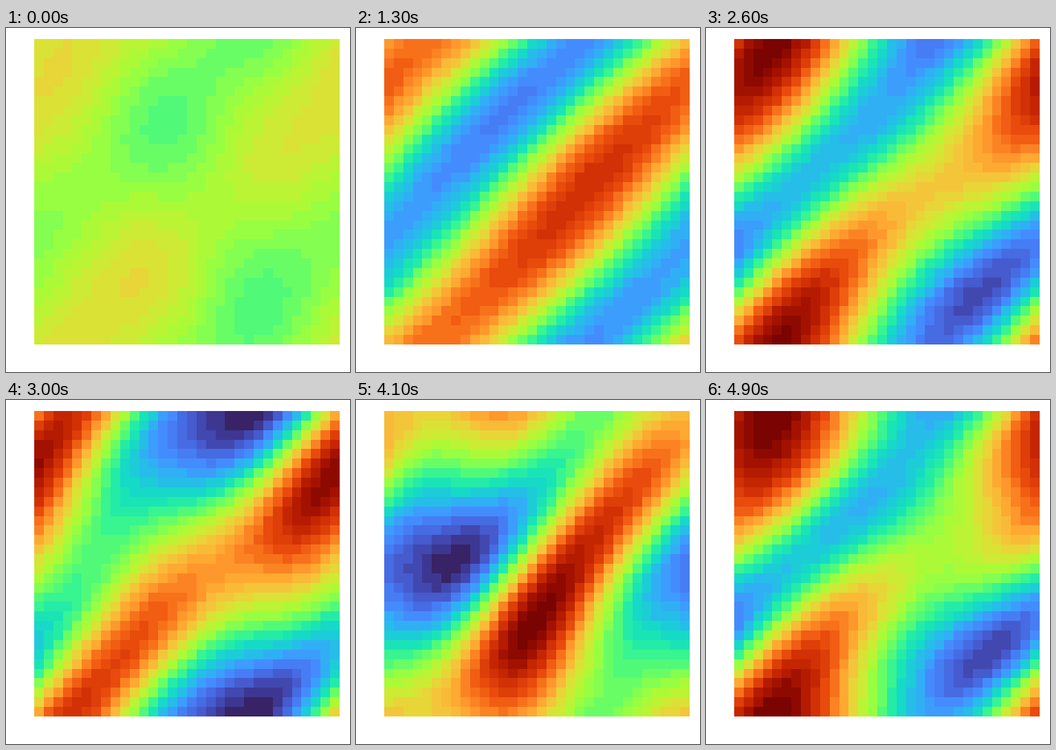
These frames come from a looping animation (500 by 500 pixels, 5000 ms). A matplotlib script:

```python
import numpy as np
import matplotlib.pyplot as plt
from matplotlib.animation import FuncAnimation

CELLS, FRAMES, INTERVAL = 32, 50, 100
MEAN = 0.51

angle = 2 * np.pi * np.arange(CELLS) / CELLS
X, Y = np.meshgrid(angle, angle)


def phasor(amp, degrees):
    return amp * np.exp(1j * np.radians(degrees))


STRIPE = phasor(1, 44.5)

# Initial disturbance that dies out, keyed by wave numbers (kx, ky)
NOISE = {
    (1, 0): phasor(0.030, 36),
    (1, -1): phasor(0.016, -160),
    (2, -1): phasor(0.012, 15),
}


def logistic(t, rate, center):
    return 1 / (1 + np.exp(-rate * (t - center)))


def modes(t):
    """Complex amplitude of every wave, keyed by wave numbers (kx, ky)."""
    # A diagonal stripe grows first, then feeds two counter-rotating ripples.
    ripple = 0.253 * logistic(t, 0.177, 20.4)
    stripe = np.sqrt((0.355 * logistic(t, 0.28, 5.35)) ** 2 - ripple ** 2)
    strong = phasor(ripple, 103 - 15.4 * t)
    weak = phasor(ripple / 2, 15 * t)
    a = (weak + strong) / 2
    b = np.conj(0.5j * (weak - strong)) * STRIPE

    # Waves produced by the coupling of the three main ones
    cos_sum = np.cos(np.angle(a * b / STRIPE))
    c21 = STRIPE * a * (0.33 - 0.22 * cos_sum)
    c12 = -STRIPE * b * (0.30 + 0.16 * cos_sum)
    return {
        (1, 1): stripe * STRIPE,
        (1, 0): a,
        (0, 1): b,
        (2, 1): c21,
        (1, 2): c12,
        (2, 2): a * b * phasor(2.5, -143),
        (2, 0): c21 * np.conj(b) * phasor(3, 30),
        (0, 2): -3.5 * c12 * np.conj(a),
    }


def superpose(waves):
    return sum(np.real(amp * np.exp(-1j * (kx * X + ky * Y)))
               for (kx, ky), amp in waves.items())


def field(t):
    return MEAN + superpose(modes(t)) + np.exp(-t / 4) * superpose(NOISE)


fig = plt.figure(figsize=(5, 5), dpi=100, facecolor="white")
ax = fig.add_axes([41 / 500, 40 / 500, 444 / 500, 444 / 500])
ax.axis("off")
image = ax.imshow(field(0), cmap=plt.get_cmap("turbo", 40), vmin=0, vmax=1,
                  interpolation="nearest", aspect="auto")


def update(frame):
    image.set_data(field(frame))
    return (image,)


anim = FuncAnimation(fig, update, frames=FRAMES, interval=INTERVAL,
                     repeat=True, repeat_delay=0, blit=False)
plt.show()
```
